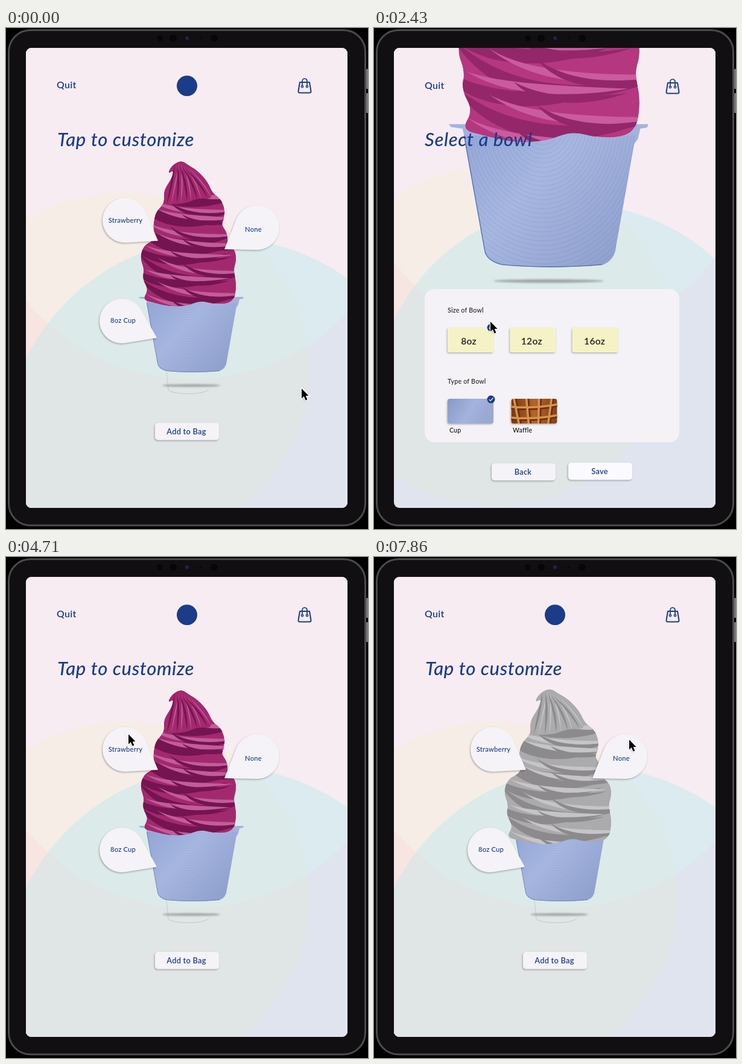
These frames come from a looping animation (600x831 px, 8 s). An HTML page with a canvas:

```html
<!DOCTYPE html>
<html lang="en">
<head>
<meta charset="utf-8">
<title>Dessert order screen</title>
<style>
html, body { margin: 0; width: 600px; height: 831px; overflow: hidden; background: #000; }
canvas { display: block; }
</style>
</head>
<body>
<canvas id="stage" width="600" height="831"></canvas>
<script>
const ctx = document.getElementById('stage').getContext('2d');
const LOOP = 8000, FPS = 7;
const NAVY = '#1b3c88', CARD = '#f5f3f7', TAU = Math.PI * 2;
const TONES = {
  strawberry: ['#741450', '#a3296f', '#c25c9b'],
  vanilla: ['#8c8a8d', '#abaaac', '#c5c4c6'],
  pistachio: ['#2a5f1f', '#468c32', '#78b95c'],
  chocolate: ['#55301f', '#85503a', '#ae7d62'],
  mint: ['#0e5a43', '#17805f', '#3fa886'],
  pumpkin: ['#a3602a', '#d08742', '#f0b67c']
};

const clamp = v => Math.max(0, Math.min(1, v));
const lerp = (a, b, p) => a + (b - a) * p;
const easeOut = p => 1 - (1 - p) ** 3;
const easeInOut = p => p * p * (3 - 2 * p);
const ramp = (t, from, to) => easeOut(clamp((t - from) / (to - from)));

function group(draw, alpha = 1) {
  if (alpha <= 0) return;
  ctx.save();
  ctx.globalAlpha *= alpha;
  draw();
  ctx.restore();
}

function fill(color) { ctx.fillStyle = color; ctx.fill(); }

function line(color, width) {
  ctx.strokeStyle = color;
  ctx.lineWidth = width;
  ctx.stroke();
}

function oval(x, y, rx, ry = rx) {
  ctx.beginPath();
  ctx.ellipse(x, y, rx, ry, 0, 0, TAU);
}

function box(x, y, w, h, r) {
  ctx.beginPath();
  ctx.roundRect(x, y, w, h, r);
}

function raised(color) {
  group(() => {
    ctx.shadowColor = 'rgba(0,0,0,.28)';
    ctx.shadowBlur = 3;
    ctx.shadowOffsetX = -1;
    ctx.shadowOffsetY = 1.5;
    fill(color);
  });
}

function text(s, x, y, size, { color = NAVY, style = '500', align = 'left' } = {}) {
  ctx.font = `${style} ${size}px Lato, "Open Sans", sans-serif`;
  ctx.letterSpacing = size * .02 + 'px';
  ctx.textAlign = align;
  ctx.fillStyle = color;
  ctx.fillText(s, x, y + size * .36);
}

const title = (s, x, y) => text(s, x, y, 31.1, { style: 'italic 500' });

function button(label, x, y, color = CARD) {
  box(x, y, 106, 28.5, 5);
  raised(color);
  text(label, x + 52, y + 14.5, 12.8, { style: '600', align: 'center' });
}

// Closed smooth outline through the midpoints of a point list.
function blob(points) {
  const n = points.length;
  const mid = i => {
    const [a, b] = [points[i % n], points[(i + 1) % n]];
    return [(a[0] + b[0]) / 2, (a[1] + b[1]) / 2];
  };
  ctx.beginPath();
  ctx.moveTo(...mid(0));
  for (let i = 1; i <= n; i++) ctx.quadraticCurveTo(...points[i % n], ...mid(i));
}

function device() {
  ctx.fillStyle = '#000';
  ctx.fillRect(0, 0, 600, 831);
  box(597, 68, 4, 33, 1); fill('#77767a');
  box(597, 108, 4, 33, 1); fill('#77767a');
  box(4.5, 3.5, 591, 821.5, 36); fill('#120f13'); line('#4b4a4c', 3);
  for (const [x, r] of [[255, 5], [277, 6], [322, 1.5], [345, 6]]) {
    oval(x, 17, r); fill('#070608');
  }
  oval(300, 17, 3); fill('#15294a');
}

// Overlapping discs; every overlap has its own tint.
function backdrop(p) {
  const pink = [lerp(308, 296, p), lerp(227, 182, p), lerp(355, 334, p)];
  const cream = [lerp(198, 200, p), lerp(566, 511, p), lerp(305, 290, p), lerp(293, 282, p)];
  const teal = [lerp(356, 336, p), lerp(708, 628, p), lerp(360, 335, p)];
  const paint = (base, creamTint, pinkTint, both) => {
    ctx.fillStyle = base;
    ctx.fillRect(33, 33, 533, 763);
    oval(...cream); fill(creamTint);
    oval(...pink); fill(pinkTint);
    ctx.clip();
    oval(...cream); fill(both);
  };
  group(() => paint('#e0e4ee', '#f7e5e2', '#f7ecf2', '#f6ede7'));
  group(() => {
    oval(...teal);
    ctx.clip();
    paint('#e0e4ee', '#dfe6e5', '#dcebef', '#dcebe9');
  });
}

// Tapered folds that fall from the left and level out to the right.
function strands(x, y, w, count, step, [dark, , light]) {
  const fold = (left, top, span, drop, thick, color) => {
    const right = left + span;
    ctx.beginPath();
    ctx.moveTo(left, top);
    ctx.bezierCurveTo(left + span * .25, top + drop, left + span * .6, top + drop * 1.1, right, top + drop * .7);
    ctx.bezierCurveTo(left + span * .6, top + drop * 1.1 + thick, left + span * .2, top + drop + thick, left, top);
    fill(color);
  };
  for (let i = 0; i < count; i++) {
    const top = y + i * step, wobble = Math.sin(i * 2.4);
    const drop = step * (1.9 + wobble * .4);
    const left = x - w * (.03 + i % 2 * .12), span = w * (1.08 + wobble * .08);
    fold(left, top, span, drop, step * .85, dark);
    fold(left + w * .2, top + step * .5, span * .85, drop * .7, -step * .55, light);
    fold(left + w * .45, top + step * .95, span * .6, drop * .45, step * .4, dark);
  }
}

const SWIRL = [[268, 242], [274, 229], [290, 219], [303, 228], [318, 237], [335, 256], [342, 273],
  [356, 284], [363, 300], [361, 318], [357, 326], [367, 340], [367, 358], [380, 368], [382, 386],
  [377, 402], [382, 422], [380, 446], [370, 457], [345, 458], [322, 452], [300, 461], [270, 462],
  [246, 456], [226, 451], [236, 434], [226, 416], [229, 400], [222, 382], [228, 360], [249, 350],
  [243, 332], [248, 305], [263, 290], [261, 270], [274, 250], [278, 236]];
const TIP = [[267, 243], [274, 228], [290, 218], [318, 236], [336, 257], [344, 284], [318, 282],
  [296, 292], [260, 292], [261, 270], [275, 250], [278, 236]];

function swirl(tones, grown, glow, alpha) {
  group(() => {
    ctx.translate(lerp(224, 217, grown) + 5 * glow, lerp(221, 219, grown));
    ctx.scale(lerp(1, 1.12, grown), lerp(1, 1.07, grown));
    ctx.translate(-224, -221);
    blob(SWIRL);
    ctx.clip();
    fill(tones[1]);
    strands(222, 250, 165, 10, 20, tones);
    blob(TIP);
    fill(tones[1]);
    for (let i = 0; i < 5; i++) {
      const x = 266 + i * 17, y = 294 - i * 3;
      for (const [dx, color, width] of [[0, tones[0], 7], [7, tones[2], 4]]) {
        ctx.beginPath();
        ctx.moveTo(280 + i * 4 + dx, 224 + i * 2);
        ctx.quadraticCurveTo(272 + i * 12 + dx, 258, x + dx, y);
        ctx.quadraticCurveTo(272 + i * 12 + dx + width, 258, 280 + i * 4 + dx, 224 + i * 2);
        fill(color);
      }
    }
    blob(SWIRL);
    fill(`rgba(225,90,170,${.28 * glow})`);
  }, alpha);
}

function cup(rim) {
  const shade = ctx.createLinearGradient(236, 450, 375, 575);
  shade.addColorStop(0, '#94a7d8');
  shade.addColorStop(.4, '#a8b7e0');
  shade.addColorStop(1, '#8d9dcb');
  group(() => {
    ctx.beginPath();
    ctx.moveTo(220, 446);
    ctx.lineTo(394, 446);
    ctx.lineTo(393, 449);
    ctx.lineTo(387, 450);
    ctx.lineTo(385, 459);
    ctx.lineTo(382, 463);
    ctx.lineTo(235, 463);
    ctx.lineTo(232, 450);
    ctx.lineTo(222, 448.5);
    ctx.closePath();
    fill('#a3b3dc');
  }, rim);
  group(() => {
    ctx.beginPath();
    ctx.moveTo(233, 456);
    ctx.lineTo(251, 556);
    ctx.quadraticCurveTo(252, 565, 266, 569);
    ctx.quadraticCurveTo(308, 573, 354, 569);
    ctx.quadraticCurveTo(365, 565, 366, 552);
    ctx.lineTo(383, 456);
    ctx.closePath();
    fill(shade);
    ctx.clip();
    for (let r = 12; r < 150; r += 4) {
      oval(302, 440, r * .75, r);
      line('rgba(80,105,175,.1)', 1);
    }
    ctx.beginPath();
    ctx.moveTo(233, 456);
    ctx.lineTo(251, 556);
    ctx.quadraticCurveTo(252, 565, 266, 569);
    ctx.quadraticCurveTo(308, 573, 354, 569);
    line('rgba(70,95,160,.8)', 1.4);
  });
}

function dessert({ bowl, flavor, grey }) {
  group(() => {
    ctx.translate(-294 * bowl - 22 * flavor, -688 * bowl - 11 * flavor);
    ctx.scale(1 + .9 * bowl, 1 + .9 * bowl);
    group(() => {
      ctx.beginPath();
      ctx.moveTo(266, 570);
      ctx.lineTo(269, 600);
      ctx.bezierCurveTo(276, 609, 330, 609, 336, 599);
      line('rgba(110,110,120,.25)', 1);
    }, 1 - bowl);
    group(() => {
      ctx.filter = 'blur(1.5px)';
      oval(307, lerp(593, 583, bowl), 48, lerp(2.3, 1.6, bowl));
      fill('rgba(120,120,125,.6)');
    });
    cup(1 - grey);
    swirl(TONES.strawberry, grey, bowl, grey < 1 ? 1 : 0);
    swirl(TONES.vanilla, grey, 0, grey);
  });
}

function bag(y) {
  group(() => {
    ctx.translate(495, y);
    ctx.lineJoin = ctx.lineCap = 'round';
    ctx.beginPath();
    ctx.moveTo(-8, -6);
    ctx.lineTo(8, -6);
    ctx.lineTo(10.5, 9);
    ctx.quadraticCurveTo(10.5, 11.5, 8, 11.5);
    ctx.lineTo(-8, 11.5);
    ctx.quadraticCurveTo(-10.5, 11.5, -10.5, 9);
    ctx.closePath();
    line(NAVY, 2);
    ctx.beginPath();
    ctx.moveTo(-4, 0);
    ctx.lineTo(-4, -8);
    ctx.arc(0, -8, 4, Math.PI, 0);
    ctx.lineTo(4, 0);
    line(NAVY, 1.7);
    for (const x of [-4, 4]) { oval(x, 1, 1.7); line(NAVY, 1.3); }
  });
}

// Round label with a tail drawn along the tangents to its tip.
function bubble(label, x, y, tipX, tipY, textX, textY) {
  const r = 37, dx = tipX - x, dy = tipY - y;
  const aim = Math.atan2(dy, dx), spread = Math.acos(r / Math.hypot(dx, dy));
  ctx.beginPath();
  ctx.arc(x, y, r, aim + spread, aim - spread + TAU);
  ctx.lineTo(tipX, tipY);
  ctx.closePath();
  raised(CARD);
  text(label, textX, textY, 11.2, { align: 'center' });
}

function badge(x, y) {
  oval(x, y, 6.5);
  fill(NAVY);
  ctx.beginPath();
  ctx.moveTo(x - 3.3, y + .2);
  ctx.lineTo(x - 1, y + 2.5);
  ctx.lineTo(x + 3.5, y - 2.5);
  line('#fff', 1.2);
}

function thumb(label, x, y, labelX, labelY, paint) {
  box(x, y, 76, 41, 4);
  raised('#ccc');
  group(() => {
    box(x, y, 76, 41, 4);
    ctx.clip();
    paint(x, y);
  });
  text(label, labelX, labelY, 10.5, { color: '#111' });
}

function cupPhoto(x, y) {
  const shade = ctx.createLinearGradient(x, y, x + 60, y + 35);
  shade.addColorStop(0, '#8799c8');
  shade.addColorStop(.6, '#a3b3dd');
  shade.addColorStop(1, '#9aa9d2');
  ctx.fillStyle = shade;
  ctx.fillRect(x, y, 76, 41);
}

function wafflePhoto(x, y) {
  const shade = ctx.createLinearGradient(x, y, x + 76, y);
  shade.addColorStop(0, '#7c3611');
  shade.addColorStop(.5, '#b5642a');
  shade.addColorStop(1, '#84411a');
  ctx.fillStyle = shade;
  ctx.fillRect(x, y, 76, 41);
  for (const [shift, color, width] of [[2, '#6b2f10', 5], [0, '#d8944a', 3.5]]) {
    ctx.beginPath();
    for (let i = 0; i < 4; i++) {
      ctx.moveTo(x + 4 + i * 21 + shift, y - 2);
      ctx.lineTo(x + 13 + i * 16 + shift, y + 43);
    }
    for (let i = 0; i < 2; i++) {
      ctx.moveTo(x - 2, y + 13 + i * 18 + shift);
      ctx.quadraticCurveTo(x + 38, y + 17 + i * 18 + shift, x + 78, y + 9 + i * 18 + shift);
    }
    line(color, width);
  }
}

function home() {
  oval(300, 96, 17);
  fill(NAVY);
  title('Tap to customize', 85, 185);
  bubble('Strawberry', 197, 319, 252, 353, 198, 319);
  bubble('None', 416, 331, 362, 367, 410, 334);
  bubble('8oz Cup', 192, 486, 250, 514, 194, 485);
  button('Add to Bag', 247, 655);
}

function bowlMenu() {
  title('Select a bowl', 84, 185);
  box(84, 433, 422, 254, 16);
  fill('#f4f2f6');
  text('Size of Bowl', 122, 468, 10.6, { color: '#222' });
  text('Type of Bowl', 122, 586, 10.6, { color: '#222' });
  ['8oz', '12oz', '16oz'].forEach((size, i) => {
    const x = 122 + i * 103.3;
    box(x, 497, 76, 41, 3);
    raised('#f5f3c5');
    text(size, x + 35 + i, 519, 15.5, { color: '#222', style: '600', align: 'center' });
  });
  thumb('Cup', 122, 615, 125, 667, cupPhoto);
  thumb('Waffle', 227.5, 615, 230, 667, wafflePhoto);
  badge(194, 497);
  badge(194, 616);
  button('Back', 195, 722);
  button('Save', 322, 721, '#fbfaff');
}

function flavorMenu() {
  title('Select your flavor(s)', 84, 170);
  box(89, 424, 422, 254, 16);
  fill('#f4f2f6');
  text('Select One or Two Flavor(s)', 131, 458, 15.3, { style: '600' });
  const options = [['Pistachio', 131, 493, 547], ['Vanilla', 232, 493, 547], ['Strawberry', 341, 493, 547],
    ['Chocolate', 131, 579, 633], ['Mint', 238, 579, 633], ['Pumpkin', 347, 579, 630]];
  for (const [name, x, y, labelY] of options) {
    const tones = TONES[name.toLowerCase()];
    thumb(name, x, y, x, labelY, () => {
      ctx.fillStyle = tones[1];
      ctx.fillRect(x, y, 76, 41);
      strands(x, y - 18, 76, 7, 9.5, tones);
    });
  }
  badge(413.5, 495);
  button('Back', 183, 714);
  button('Save', 311, 713);
}

const POINTER = [[0, 490, 598], [570, 490, 598], [1710, 192, 487], [2430, 193, 487], [3430, 354, 737],
  [3710, 354, 737], [4710, 203, 294], [5000, 203, 294], [5600, 280, 513], [6000, 280, 513],
  [6500, 362, 731], [7140, 362, 731], [7850, 423, 303], [LOOP, 423, 303]];

function pointer(t) {
  const i = POINTER.findIndex(key => key[0] > t);
  const [t0, x0, y0] = POINTER[i - 1], [t1, x1, y1] = POINTER[i];
  const p = easeInOut((t - t0) / (t1 - t0));
  group(() => {
    ctx.translate(lerp(x0, x1, p), lerp(y0, y1, p));
    ctx.beginPath();
    for (const [x, y] of [[0, 0], [0, 16.5], [3.8, 13], [6.6, 19.5], [9.4, 18.3], [6.7, 12], [11.6, 12]]) {
      ctx.lineTo(x, y);
    }
    ctx.closePath();
    raised('#000');
    line('#fff', 2.4);
    fill('#000');
  });
}

function render(now) {
  const t = Math.floor((now % LOOP + 5) * FPS / 1000) * 1000 / FPS % LOOP;
  const bowl = ramp(t, 1900, 2300) - ramp(t, 3650, 3990);
  const flavor = ramp(t, 4900, 5300) - ramp(t, 6520, 6870);
  const grey = ramp(t, 5400, 5700);
  device();
  group(() => {
    box(33, 33, 533, 763, 9);
    ctx.clip();
    backdrop(bowl + flavor);
    dessert({ bowl, flavor, grey });
    text('Quit', 84, 94 + bowl + flavor, 15.9, { style: '600' });
    bag(96 + bowl + 2 * flavor);
    group(home, 1 - bowl - flavor);
    group(bowlMenu, bowl);
    group(flavorMenu, flavor);
    pointer(t);
  });
}

const start = performance.now();
function tick() {
  render(performance.now() - start);
  requestAnimationFrame(tick);
}
tick();
</script>
</body>
</html>
```
